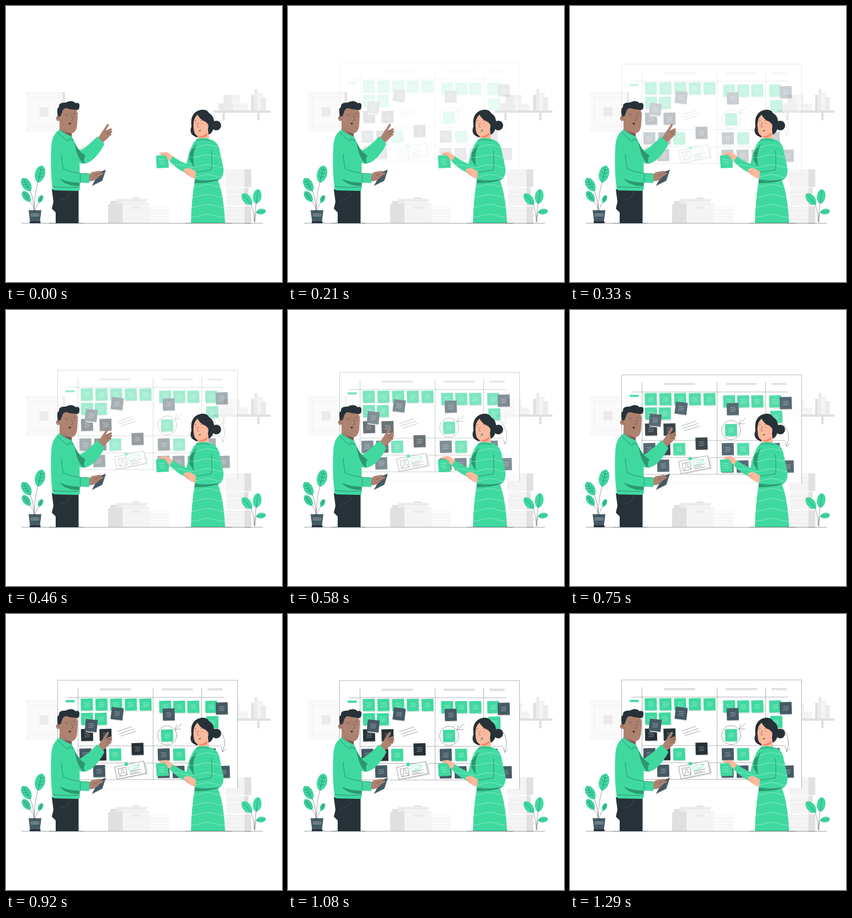
Write an HTML page that moves like this. It is 500x500 px and loops after 1.33 s.

```html
<!DOCTYPE html>
<html lang="en">
<head>
<meta charset="utf-8">
<title>Planning board</title>
<style>
  html, body { margin: 0; height: 100%; overflow: hidden; background: #fff; }
  svg { display: block; width: 100vw; height: 100vh; }
  .line, .white, .pale, .limb, .finger { fill: none; stroke-linecap: round; stroke-linejoin: round; }
  .line { stroke: #263238; stroke-width: .45; }
  .white { stroke: #fff; stroke-width: .45; }
  .pale { stroke: #e0e0e0; stroke-width: .5; }
  .limb { stroke: #3fd9a0; stroke-width: 17; stroke-linecap: butt; }
  .finger { stroke: #ae8270; stroke-width: 4; }
  .green { fill: #3fd9a0; }
  .shade { fill: #2c9870; }
  .dark { fill: #263238; }
  .slate { fill: #455a64; }
  .tan { fill: #ae8270; }
  .peach { fill: #ffb99d; }
  .g1 { fill: #fafafa; } .g2 { fill: #f4f4f4; } .g3 { fill: #ebebeb; } .g4 { fill: #e0e0e0; }
</style>
</head>
<body>
<svg viewBox="0 0 500 500">
  <clipPath id="dress">
    <path d="M346 241Q357 237 368 241Q385 245 387 262L394 294Q395 312 384 316Q394 340 397 393H335Q336 350 342 316L340 304Q320 306 296 281L302 272Q314 281 327 286Q333 252 346 241Z"/>
  </clipPath>

  <g id="room">
    <path class="pale" d="M36 156.500h67M36 156.500l8 9.500h53l6-9.500M44 166v52l-8 8.500h67l-6-8.500H44"/>
  </g>

  <g id="board">
    <path d="M93.500 119.500h326v196.500h-326z" fill="#fff"/>
    <path class="pale" d="M93.500 316h326"/>
    <path class="line" d="M93.500 316V119.500h326V316" stroke-opacity=".8"/>
    <path d="M170 136h56.500M282 136h56.500M365 136h27.500" stroke="#e0e0e0" stroke-width="4"/>
    <path d="M108 157.500h16.500" stroke="#3fd9a0" stroke-width="4"/>
    <path class="line" d="M112 150.500H395M130.500 133V299.500M266.500 133V299.500M354.500 133V299.500M131 238.300H390M157 269.300H390M131 299.500H385" stroke-opacity=".8"/>
    <g id="notes"></g>
    <circle class="line" cx="292" cy="219.500" r="17.300"/>
    <path class="line" d="M306 209L318 198.500M309 200L306.500 208.500L317 208M202 212L228 203.500M205 216.500L232 207.500M208 220.500L235 212"/>
    <path class="line" d="M386 208Q402 226 392.500 249M390 241L392.500 249.500L398.500 244"/>
    <g transform="translate(197 276.500) rotate(-11.500)">
      <path d="M2 3h55v22H2z" fill="#e3e3e3"/>
      <path class="line" d="M0 0h53.500v22.500H0z" style="fill:#fff"/>
      <path class="line" d="M5.500 4.500h14v14h-14zM7.500 18.500q0-5 3.500-5v-2.500q-2-4 1.500-4.500t1.500 4.500v2.500q4 0 4 5M25 13.500h21M25 16.500h14M25 19h20"/>
      <path d="M23 7q9-5 22-2l-3 5q-9 3-16 2zM31 8l4 2 9-5" fill="none" stroke="#3fd9a0" stroke-width=".6"/>
      <circle class="green" cx="21.500" cy="-1" r="3.300"/>
    </g>
  </g>

  <path class="line" d="M29 393.500H465M78 393.500H140M325 393.500H408"/>

  <g id="plants">
    <path class="slate" d="M41 370h23l-2.500 20h-18z"/>
    <path class="dark" d="M43 390h19.500v3.500H43z"/>
    <path class="white" d="M46 376.500h13.500v4H46zM48 378.500h9"/>
  </g>

  <g id="man">
    <path class="dark" d="M83 332L131.500 333V393.500H90V374L83 367L86 355Z"/>
    <path class="line" d="M97 352Q110 351 116 338" style="stroke:#5f6b70"/>
    <path class="finger" d="M176 229L184.500 215.500M180 228L190 223.500M181 232L190.500 228M181 235L189 233"/>
    <path class="tan" d="M166 240L176 225L186 226L187 237L175 248Z"/>
    <path class="line" d="M182 228.500L190 225.500M183 232.500L190 230.500"/>
    <path class="green" d="M119 246L134 262Q146 256 165.500 236L178.500 250Q163 278 148 284Q138 288 128 282Z"/>
    <path class="green" d="M97 224Q83 232 82 256Q80 300 84.500 331Q85 334 89 334L130 335Q133.500 335 133.500 331V290L131 262L122 241Z"/>
    <path class="shade" d="M124 247L132 261Q138 267 144 271Q139 279 143 286Q130 282 124 247Z"/>
    <path class="shade" d="M97 312Q110 320 133.500 320V326Q106 326 97 312Z"/>
    <path class="limb" d="M92 275Q90 302 106 307Q125 312 151 312"/>
    <path class="line" d="M100 268Q101 284 104 295Q120 303 149 304M134.500 305V321M84.500 327Q108 330 133 328M131 262Q136 260 142 254"/>
    <path class="slate" d="M169 301L181 296.500L174.500 316.500L155.500 326Z"/>
    <path class="finger" d="M156 303L170 300.500M162 308L174 303.500"/>
    <path class="tan" d="M151 304L162 300L172 306Q162 318 151 317.500Z"/>
    <path class="line" d="M166 304L160 307M171 308l-6 3"/>
    <path class="tan" d="M97 200V224Q105 234 118.500 236L119.500 226Z"/>
    <path d="M101 219Q108 229 119 231V236Q106 230 101 219Z" fill="#7c5548"/>
    <path class="green" d="M97 223Q106 232 119 235.500L120.500 244L115 240L113 245Q101 238 95 229Z"/>
    <path class="line" d="M97 223Q106 232 119 235.500L120.500 244L115 240L113 245Q101 238 95 229"/>
    <path class="tan" d="M98 190L97 209Q101 229 118 230.500Q128 230 129 214L130 196Q129 186 122 185H104Z"/>
    <ellipse class="tan" cx="95" cy="203.500" rx="4.300" ry="5"/>
    <path class="line" d="M93 202q3-1 4 3M118.500 197L121 206Q120 208 117.500 208"/>
    <path class="line" d="M106.500 197.500q3-2 6-1M121 194.800q3-1.500 5 .2" stroke-width="1"/>
    <path class="line" d="M111 201v1M123.500 199.500v1" stroke-width="1.800"/>
    <path d="M113 212.500q2.500-2 5-.5q-1 3-3.500 3z" fill="#5d3026"/>
    <path class="dark" d="M94 200Q91 185 96 183Q95 174 108 175Q119 169 126 176Q134 174 133 182Q133 190 126 188Q117 188 109 185Q103 185 101 194L98.500 200Z"/>
  </g>

  <g id="woman">
    <path class="dark" d="M347 190Q362 184 368 194Q378 200 377 214Q376 232 364 234L346 238Q330 233 336 218Q333 197 347 190Z"/>
    <circle class="dark" cx="381" cy="216.500" r="8.700"/>
    <path class="peach" d="M347 231V242H368L366 224Z"/>
    <path d="M350 235Q359 236 364 229L365 234Q358 240 350 238Z" fill="#ee8d72"/>
    <path class="peach" d="M347 197Q338 204 340 222Q341 236 351 236Q362 235 366 223Q369 213 360 209Q352 206 347 197Z"/>
    <path class="line" d="M348.500 211L346 218.500Q347 220 349 219.500"/>
    <path class="line" d="M341.500 208.500q2-2 4-.5M352.500 207.500q3-2 5 1" stroke-width=".9"/>
    <path class="line" d="M344 212v1M354.500 211.500v1" stroke-width="1.700"/>
    <path class="shade" d="M348.500 225.500q2.500 0 4.500-2q0 4-2.500 4z"/>
    <g id="cloth" clip-path="url(#dress)">
      <path class="green" d="M290 235h110v160H290z"/>
      <path class="shade" d="M333 266Q340 254 346 250Q336 268 341 292L332 278ZM342 315Q362 320 385 314Q375 321 341 321Z"/>
    </g>
    <path class="line" d="M345 244Q356 240 369 244M372 262Q374 282 372 297L345 301M343 315Q364 318 384 315.500"/>
    <path class="green" d="M271.500 271L293.500 269.500L295 293L273 294Z"/>
    <path class="white" d="M277 278q3-2 5 0t5-1M277 282q3-2 5 0t5-1M279 286q3-2 5 0t4-1"/>
    <path class="peach" d="M302 273L297 281Q292 278 291 274L286 270L279 269Q276 267.500 279 266L289 264.500Q297 266 302 273Z"/>
    <path class="peach" d="M344 300L336 295Q328 292 322 296Q321 299 325 300L323 302L333 309Q337 312 343 313Z"/>
    <path class="line" d="M281 268.500L288 269.500L292 275M325 300l6 1M327 304l5 1" stroke-opacity=".5"/>
  </g>
</svg>

<script>
const $ = id => document.getElementById(id);
const add = (id, markup, where = 'beforeend') => $(id).insertAdjacentHTML(where, markup);
const box = (tone, x, y, w, h) =>
  add('room', `<path class="${tone}" d="M${x} ${y}h${w}v${h}h${-w}z"/>`);
const rule = (x, y, w) => add('room', `<path class="pale" d="M${x} ${y}h${w}"/>`);

function drawRoom() {
  add('room', '<path class="g1" d="M36 156h67v70.500h-67z"/>', 'afterbegin');
  box('g4', 102.5, 156, 4.5, 70);
  box('g3', 60.5, 183.5, 16.5, 16.5);

  // Shelf with lying and standing books
  for (const [x, y, w, h] of [[385, 176.5, 53, 12.5], [394, 161, 30, 15.5]]) {
    box('g2', x, y, w, h);
    box('g3', x, y, w / 2, h);
    rule(x + w / 2 + 2, y + 4, w / 2 - 4);
  }
  for (let i = 0; i < 4; i++) {
    const h = [28, 38.5, 32, 24][i];
    box(['g4', 'g3', 'g2', 'g3'][i], 444 + 6 * i, 189 - h, i < 2 ? 5.5 : 9, h);
  }
  box('g4', 375, 189, 104, 4.5);
  for (const x of [392, 455]) box('g4', x, 193.5, 4.5, 13.5);

  // Paper piles
  for (let i = 0; i < 3; i++) {
    const x = [397, 399, 393][i], y = 296 + 33.5 * i, w = [48, 41, 52][i];
    box('g2', x, y, w, 32);
    box('g4', 432, y, x + w - 433, 32);
    for (let j = 1; j < 4; j++) rule(x, y + 8 * j, w - 2);
  }

  // Cartons
  box('g4', 185, 359, 26, 34);
  box('g4', 189, 353, 22, 6);
  box('g3', 199, 349.5, 56, 9);
  box('g4', 229, 347, 13, 2.5);
  box('g2', 211, 354, 44, 39);
  box('g2', 211, 358.5, 49, 34.5);
  rule(211, 358.5, 49);
  box('g3', 227, 363, 17, 4.5);
  box('g1', 260, 363, 35, 30);
  for (let y = 370; y < 393; y += 6) rule(261, y, 33);
}

// One letter per note, a dot leaves a gap
const tones = { g: 'green', s: 'slate', k: 'dark' };
function row(letters, x, y, gap = 0, tilt = -1.5) {
  const scribble = [0, 1, 2].map(i => `M${6 + i % 2} ${8.5 + 3.2 * i}q2.500-1.500 4.500-.4t4.500-.9`).join('');
  [...letters].forEach((letter, i) => {
    if (letter === '.') return;
    add('notes', `<g transform="translate(${x + gap * i} ${y}) rotate(${tilt} 11 11)">
      <path d="M1 20L22 2L22 24L2 23.500Z" fill="#e3e3e3"/>
      <path class="${tones[letter]}" d="M0 0h21.700v22H0z"/>
      <path class="white" d="${scribble}"/></g>`);
  });
}

function drawNotes() {
  row('ggggg', 135.5, 152.5, 26.6);
  row('ggg', 277.5, 156.5, 25.5);
  row('g', 361, 156.5);
  row('gg', 136, 178.5, 25);
  row('g', 363, 184.5);
  row('kk', 136, 207.5, 33.5);
  row('g', 281, 208.5);
  row('skg', 133, 243, 27);
  row('k', 227.5, 233);
  row('sg.s', 275, 243, 27.8);
  row('s', 158, 273);
  row('sss.s', 274.5, 274.5, 27.3);
  row('s', 380, 159.5);
  row('s', 284, 170.5);
  row('s', 190.5, 169, 0, 7);
  row('s', 143.5, 190.5, 0, 6);
}

// A leaf around (x, y) with its stem running down to the root
function leaf(rootX, rootY, x, y, size, tilt, veined) {
  const angle = tilt * Math.PI / 180, w = size * .76;
  const baseX = x - size * Math.sin(angle), baseY = y + size * Math.cos(angle);
  const veins = [-.4, 0, .4].map(k =>
    `M${-w * .5} ${size * (k - .25)}L0 ${size * k}L${w * .5} ${size * (k - .25)}`).join('');
  add('plants', `<path class="line" d="M${rootX} ${rootY}Q${rootX} ${(rootY + baseY) / 2} ${baseX} ${baseY}"/>
    <g transform="translate(${x} ${y}) rotate(${tilt})">
    <path class="green" d="M0 ${-size}C${w} ${-size * .8} ${w} ${size * .7} 0 ${size}C${-w} ${size * .7} ${-w} ${-size * .8} 0 ${-size}Z"/>
    <path class="line" d="M0 ${-size * .8}V${size}${veined ? veins : ''}" stroke-opacity=".8"/></g>`);
}

function drawPlants() {
  leaf(51, 371, 61.5, 304.5, 16, 14, true);
  leaf(51, 371, 37, 323.5, 14, -32, true);
  leaf(51, 371, 37, 345, 11.5, -35, true);
  leaf(53, 371, 62.5, 349.5, 7.5, 25, true);
  leaf(450, 391, 455, 345, 13.5, 8);
  leaf(450, 391, 436.5, 350, 13, -40);
  leaf(451, 391, 462, 372.5, 9, 82);
}

function drawWaves() {
  for (let y = 254; y < 395; y += 18)
    add('cloth', `<path class="white" d="M295 ${y}q14-5 28 0t28 0t28 0t28 0" stroke-opacity=".8"/>`);
}

// Board drops in with a slight overshoot
const bezier = (s, a, b) => 3 * (1 - s) * s * ((1 - s) * a + s * b) + s ** 3;
function ease(x) {
  let lo = 0, hi = 1;
  for (let i = 0; i < 24; i++) {
    const mid = (lo + hi) / 2;
    if (bezier(mid, .36, .5) < x) lo = mid; else hi = mid;
  }
  return bezier(lo, -.01, 1.38);
}

const LOOP = 1330, STEPS = 32, STEP = 1000 / 24, DROP = 20;
function draw(now) {
  const step = Math.floor((now % LOOP + 3.4) / STEP);
  const p = ease(Math.min(1, (step + 1) / STEPS));
  $('board').setAttribute('opacity', step ? Math.max(0, Math.min(1, p)) : 0);
  $('board').setAttribute('transform', `translate(0 ${DROP * (p - 1)})`);
}

drawRoom();
drawNotes();
drawPlants();
drawWaves();
const start = performance.now();
(function tick() {
  draw(performance.now() - start);
  requestAnimationFrame(tick);
})();
</script>
</body>
</html>
```
